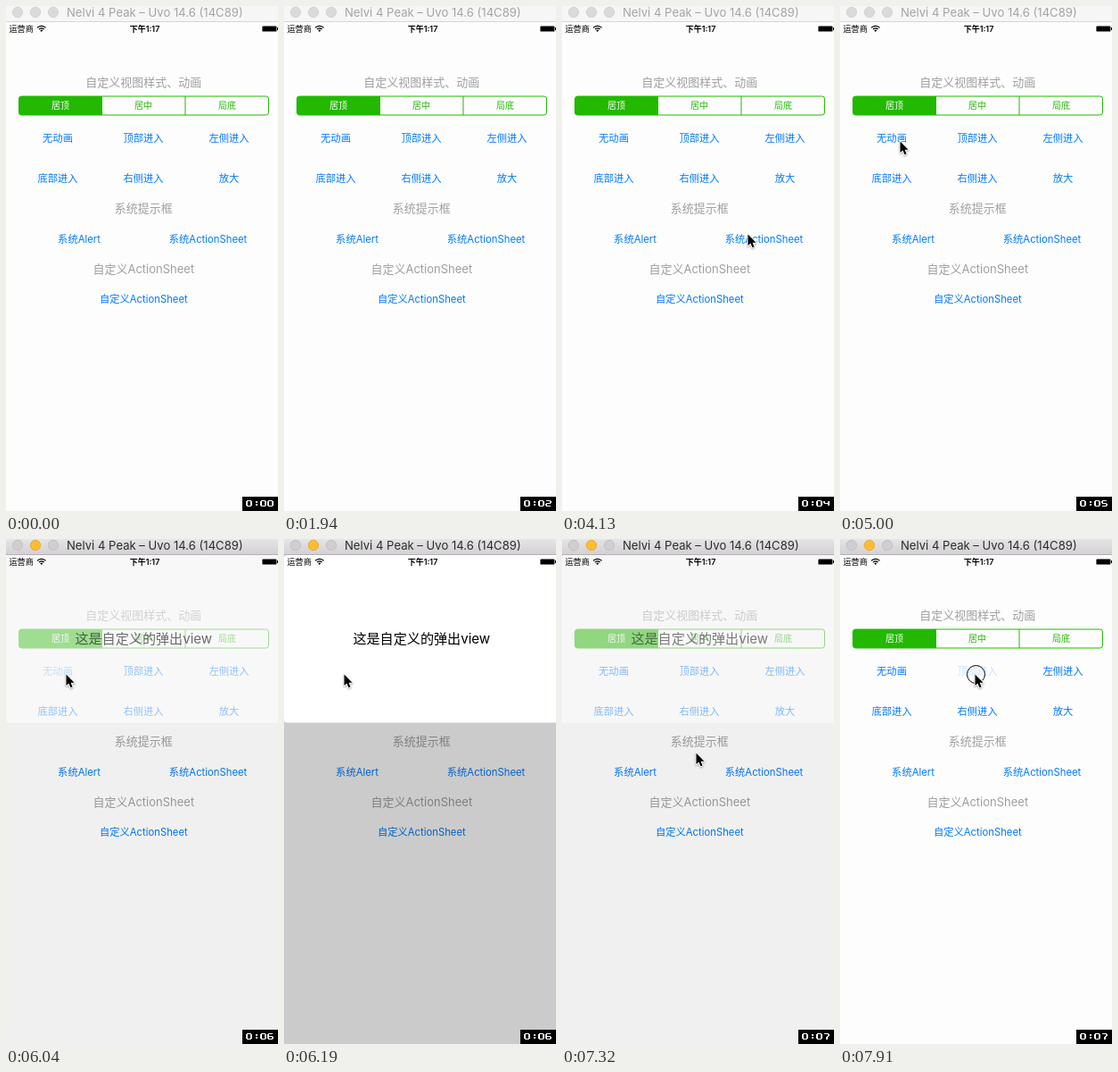
Animation, 305 px wide and 565 px high, one loop 8 s. Source, as an HTML page with a canvas:

```html
<!DOCTYPE html>
<html lang="zh-CN">
<head>
<meta charset="utf-8">
<style>
html, body { margin: 0; width: 100%; height: 100%; overflow: hidden; background: #fdfdfd; }
canvas { display: block; }
</style>
</head>
<body>
<canvas id="stage" width="305" height="565"></canvas>
<script>
const W = 305, H = 565, LOOP = 8000;
const ctx = document.getElementById('stage').getContext('2d');
const FONT = 'Inter, "Noto Sans CJK SC", "Noto Sans CJK", sans-serif';
const BLUE = '#007aff', GREEN = '#22b900', GREY = '#9f9f9f';

// Each key holds its value until the next one: [time, x, y]
const CURSOR = [
  [3730, 262, 283], [4130, 207, 254], [4270, 113, 171], [4420, 90, 161],
  [4560, 73, 155], [4710, 66, 150], [6480, 81, 155], [6620, 123, 179],
  [6770, 147, 234], [6920, 149, 238], [7470, 148, 185], [7620, 148, 167],
  [7770, 149, 154], [7910, 150, 150]
];
// [time, panel opacity, backdrop opacity]
const POPUP = [[6040, 0.57, 0.05], [6190, 1, 0.2], [7320, 0.5, 0.05], [7470, 0, 0]];
const SECONDS = [900, 1940, 2990, 3880, 5000, 6040, 6920];
const CLICKS = [[5740, 6040], [7020, 7170], [7910, LOOP]];
const ACTIVE_AT = 5740;

const held = (keys, t) => keys.filter(k => k[0] <= t).pop();
const within = (t, [from, to]) => t >= from && t < to;

function text(str, x, midY, size, color, { align = 'center', weight = 400, alpha = 1 } = {}) {
  ctx.save();
  ctx.globalAlpha *= alpha;
  ctx.font = `${weight} ${size}px ${FONT}`;
  ctx.textAlign = align;
  ctx.fillStyle = color;
  ctx.fillText(str, x, Math.round(midY + size * 0.34));
  ctx.restore();
}

function rect(x, y, w, h, color) {
  ctx.fillStyle = color;
  ctx.fillRect(x, y, w, h);
}

function titleBar(active) {
  const shade = ctx.createLinearGradient(0, 0, 0, 17);
  shade.addColorStop(0, active ? '#e6e4e6' : '#f6f6f6');
  shade.addColorStop(1, active ? '#d3d1d3' : '#f6f6f6');
  rect(0, 0, W, 17, shade);
  rect(0, 17, W, 1, active ? '#b4b2b4' : '#d6d6d6');
  [13, 33, 53].forEach((x, i) => {
    const lit = active && i === 1;
    ctx.beginPath();
    ctx.arc(x, 7, 5.7, 0, Math.PI * 2);
    ctx.fillStyle = lit ? '#fdbd2e' : active ? '#d0ced0' : '#dadada';
    ctx.fill();
    ctx.lineWidth = 0.7;
    ctx.strokeStyle = lit ? '#dfa023' : active ? '#bbb9bb' : '#cccccc';
    ctx.stroke();
  });
  text('Nelvi 4 Peak – Uvo 14.6 (14C89)', 68, 7.3, 13.1, active ? '#2c2c2c' : '#a4a4a4', { align: 'left' });
}

function statusBar() {
  text('运营商', 3.5, 25.6, 9.1, '#000', { align: 'left' });
  text('下午1:17', 155.5, 25.6, 9, '#000', { weight: 600 });
  ctx.strokeStyle = ctx.fillStyle = '#000';
  ctx.lineWidth = 1.3;
  for (const r of [3.7, 6.3]) {
    ctx.beginPath();
    ctx.arc(39.8, 28.6, r, -Math.PI * 0.77, -Math.PI * 0.23);
    ctx.stroke();
  }
  ctx.beginPath();
  ctx.moveTo(39.8, 28.9);
  ctx.arc(39.8, 28.6, 2, -Math.PI * 0.77, -Math.PI * 0.23);
  ctx.fill();
  ctx.beginPath();
  ctx.roundRect(287.4, 22.4, 16, 6.2, 1.2);
  ctx.fill();
  rect(304, 24, 1, 3, '#000');
}

function segments() {
  ctx.save();
  ctx.beginPath();
  ctx.roundRect(14.5, 101, 280, 21, 3);
  ctx.save();
  ctx.clip();
  rect(14, 101, 94, 22, GREEN);
  ctx.restore();
  ctx.strokeStyle = GREEN;
  ctx.lineWidth = 1;
  ctx.stroke();
  rect(107, 101, 1, 21, GREEN);
  rect(200.5, 101, 1, 21, GREEN);
  ctx.restore();
  text('居顶', 61, 112, 10, '#fff');
  text('居中', 154, 112, 10, GREEN);
  text('局底', 248, 112, 10, GREEN);
}

function page(t) {
  rect(0, 18, W, H - 18, '#fdfdfd');
  text('自定义视图样式、动画', 154.3, 86, 13, GREY);
  segments();

  const link = (str, x, y, alpha) => text(str, x, y, 11.3, BLUE, { alpha });
  const firstAlpha = within(t, [5740, 6040]) ? 0.2 : within(t, [6040, 6190]) ? 0.5 : 1;
  link('无动画', 58, 148, firstAlpha);
  link('顶部进入', 154, 148, t >= 7910 ? 0.2 : 1);
  link('左侧进入', 250, 148);
  link('底部进入', 58, 193);
  link('右侧进入', 154, 193);
  link('放大', 250, 193);
  text('系统提示框', 154.3, 227, 13, GREY);
  link('系统Alert', 82, 261);
  link('系统ActionSheet', 226.5, 261);
  text('自定义ActionSheet', 154.3, 295, 13, GREY);
  link('自定义ActionSheet', 154.3, 328.5);
}

function popup(t) {
  const state = held(POPUP, t);
  if (!state) return;
  const [, panel, backdrop] = state;
  rect(0, 18, W, H - 18, `rgba(0,0,0,${backdrop})`);
  ctx.save();
  ctx.globalAlpha = panel;
  ctx.beginPath();
  ctx.roundRect(0, 18, 308, 187.5, 3.5);
  ctx.fillStyle = '#fff';
  ctx.fill();
  text('这是自定义的弹出view', 154.3, 112, 15.1, '#000');
  ctx.restore();
}

function pointer(t) {
  const place = held(CURSOR, t);
  if (!place) return;
  const [, x, y] = place;
  if (CLICKS.some(span => within(t, span))) {
    ctx.beginPath();
    ctx.arc(x + 2.5, y + 1.5, 10, 0, Math.PI * 2);
    ctx.strokeStyle = '#000';
    ctx.lineWidth = 1;
    ctx.stroke();
  }
  ctx.save();
  ctx.translate(x, y);
  const arrow = new Path2D('M1.5 1.5V14L4.4 11.4L6.5 16.3L8.6 15.4L6.6 10.7H10.6Z');
  ctx.shadowColor = 'rgba(0,0,0,0.35)';
  ctx.shadowBlur = 2;
  ctx.shadowOffsetY = 1;
  ctx.strokeStyle = '#fff';
  ctx.lineWidth = 2;
  ctx.lineJoin = 'round';
  ctx.stroke(arrow);
  ctx.shadowColor = 'transparent';
  ctx.fillStyle = '#000';
  ctx.fill(arrow);
  ctx.restore();
}

// Strokes of the block digits on a 7 by 7 grid: [x, y, width, height]
const BARS = {
  a: [1, 0, 5, 1], b: [5, 1, 2, 2], c: [5, 4, 2, 2], d: [1, 6, 5, 1],
  e: [0, 4, 2, 2], f: [0, 1, 2, 2], g: [1, 3, 5, 1],
  l: [0, 3, 2, 1], r: [5, 3, 2, 1],
  s: [3, 0, 2, 6], t: [1, 1, 2, 1], u: [3, 4, 2, 3], v: [4, 3, 2, 1]
};
const DIGITS = ['abcdeflr', 'std', 'abged', 'abgcd', 'fgbcr', 'afgcd', 'afgecdl', 'abvu'];

function digit(n, x) {
  for (const bar of DIGITS[n]) {
    const [bx, by, w, h] = BARS[bar];
    rect(x + bx, 553 + by, w, h, '#fff');
  }
}

function timer(t) {
  rect(265, 549, 40, 16, '#000');
  digit(0, 269);
  rect(280, 554, 2, 2, '#fff');
  rect(280, 557, 2, 2, '#fff');
  digit(0, 285);
  digit(SECONDS.filter(s => s <= t).length, 293);
}

function draw(t) {
  ctx.clearRect(0, 0, W, H);
  page(t);
  popup(t);
  statusBar();
  titleBar(t >= ACTIVE_AT);
  pointer(t);
  timer(t);
}

const start = performance.now();
function tick() {
  draw((performance.now() - start) % LOOP);
  requestAnimationFrame(tick);
}
tick();
</script>
</body>
</html>
```
